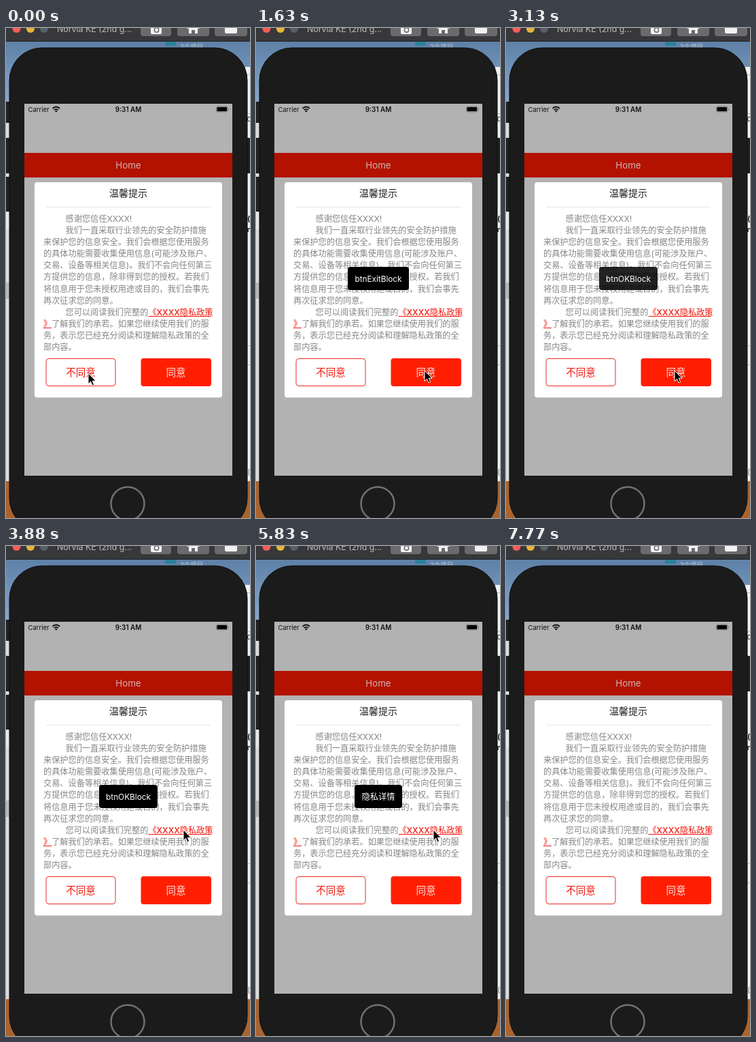
Recreate the animation shown at these times as an HTML page. Size 359 px wide and 718 px high, loop 8.02 s.

```html
<!DOCTYPE html>
<html lang="zh-CN">
<head>
<meta charset="utf-8">
<style>
html, body { margin: 0; width: 100%; height: 100%; overflow: hidden; background: #1b1b1b; }
svg { display: block; width: 359px; height: 718px; }
text { font-family: Inter, "Noto Sans CJK SC", "Noto Sans CJK", sans-serif; text-spacing-trim: space-all; }
.mid { text-anchor: middle; }
#body { font-size: 12.2px; fill: #858585; }
.link { fill: #f3160c; font-weight: 500; }
</style>
</head>
<body>
<svg viewBox="0 0 359 718">
  <defs>
    <linearGradient id="sky" x2="0" y2="1">
      <stop offset="0" stop-color="#54779f"/><stop offset="1" stop-color="#8aa9cb"/>
    </linearGradient>
  </defs>

  <!-- desktop -->
  <rect width="359" height="718" fill="#dcdcdc"/>
  <rect width="359" height="110" fill="url(#sky)"/>
  <rect y="270" width="6" height="25" fill="#e9e9e9"/>
  <rect y="373" width="6" height="24" fill="#b9b9b9"/>
  <rect x="352" y="57" width="7" height="607" fill="#f1f1f1"/>
  <path d="M352 68.500h7M352 125.500h7M352 465.500h7M352 493.500h7" stroke="#bdbdbd"/>
  <g font-size="11" fill="#222">
    <text x="354.500" y="137">d</text>
    <text x="355" y="283" font-weight="700">(</text>
    <text x="354.500" y="299" font-weight="700">n</text>
    <text x="355" y="654" fill="#777">(</text>
  </g>
  <rect y="664" width="359" height="54" fill="#a9642f"/>
  <rect x="234" y="18" width="16" height="8" rx="1" fill="#2b819b"/>
  <text x="256" y="31" font-size="9.500" fill="#c5ced8">2个项目</text>

  <!-- window bar -->
  <rect width="359" height="20" fill="#38383a"/>
  <path d="M0 19.500H359" stroke="#202225"/>
  <circle cx="15.500" cy="1" r="6" fill="#fc5b57"/>
  <circle cx="36" cy="1" r="6" fill="#e5b53c"/>
  <circle cx="56" cy="1" r="6" fill="#57606b"/>
  <text x="75" y="6" font-size="12.400" fill="#bcbcbd">Norvia KE (2nd g...</text>
  <g fill="#6b6b6d">
    <rect x="198" y="-10" width="45" height="22" rx="4"/>
    <rect x="252" y="-10" width="47" height="22" rx="4"/>
    <rect x="307" y="-10" width="48" height="22" rx="4"/>
  </g>
  <g fill="#f2f2f2">
    <rect x="213" y="-5" width="16" height="14" rx="2"/>
    <path d="M266 1L275.500 -7L285 1H282V8H278V3H273V8H269V1Z"/>
    <rect x="322" y="-6" width="18" height="14" rx="2"/>
  </g>
  <circle cx="221.500" cy="3" r="3.200" fill="none" stroke="#6b6b6d" stroke-width="1.500"/>

  <!-- phone -->
  <g fill="#202123">
    <rect x="-4" y="108" width="11" height="31" rx="2"/>
    <rect x="-4" y="161" width="11" height="52" rx="2"/>
    <rect x="-4" y="218" width="11" height="51" rx="2"/>
    <rect x="352" y="161" width="11" height="52" rx="2"/>
  </g>
  <rect x="5" y="29" width="350" height="708" rx="48" fill="#1b1b1b" stroke="#0d0e10"/>
  <circle cx="179" cy="697" r="24.500" fill="#1b1b1b" stroke="#717171" stroke-width="2.500"/>
  <rect x="27" y="111" width="306" height="545" fill="#b2b2b2"/>
  <text x="32.500" y="123" font-size="9.500" fill="#111">Carrier</text>
  <g fill="none" stroke="#111" stroke-width="1.900">
    <path d="M68.500 117.800a7.400 7.400 0 0 1 10.600 0M70.700 120.200a4.400 4.400 0 0 1 6.200 0"/>
  </g>
  <path d="M72 121.700a2.500 2.500 0 0 1 3.600 0L73.800 123.800Z" fill="#111"/>
  <text x="180" y="123" class="mid" font-size="9.900" font-weight="600" fill="#111">9:31 AM</text>
  <rect x="309.500" y="115" width="16.500" height="8" rx="2.200" fill="none" stroke="#666" stroke-width=".8"/>
  <rect x="310.500" y="116" width="14.500" height="6" rx="1.200"/>
  <path d="M327 117.500q1.400 1.500 0 3Z" fill="#555"/>
  <rect x="27" y="183" width="306" height="36" fill="#b31200"/>
  <text x="180" y="206" class="mid" font-size="13.300" fill="#d0b3af">Home</text>

  <!-- dialog -->
  <rect x="42" y="226" width="276" height="315.500" rx="4" fill="#fff"/>
  <text x="180" y="247.300" class="mid" font-size="14" fill="#222">温馨提示</text>
  <path d="M59 262.500H301" stroke="#e6e6e6"/>
  <g id="body"></g>
  <path d="M209.500 422.500H302M55 439.500H67" stroke="#f3160c"/>
  <rect x="59" y="484.500" width="102" height="40" rx="4" fill="#fff" stroke="#ec2b25"/>
  <rect x="198.500" y="484" width="103.500" height="41" rx="4" fill="#ff1f00"/>
  <text x="110" y="510" class="mid" font-size="14.500" fill="#f3160c">不同意</text>
  <text x="250" y="510" class="mid" font-size="14.500" fill="#ffe4df">同意</text>

  <g id="toast">
    <rect y="350" height="34" rx="4"/>
    <text x="180" y="371.600" class="mid" fill="#fff"></text>
  </g>
  <path id="cursor" d="M0 0V15.500L3.600 12.200L6 17.800L8.600 16.700L6.200 11.200H11Z" stroke="#fff" stroke-width="1"/>
</svg>
<script>
const LOOP = 8020, STEP = 150;
const $ = s => document.querySelector(s);

// A leading tab marks an indented paragraph; | separates the link.
const lines = [
  '\t感谢您信任XXXX!',
  '\t我们一直采取行业领先的安全防护措施',
  '来保护您的信息安全。我们会根据您使用服务',
  '的具体功能需要收集使用信息(可能涉及账户、',
  '交易、设备等相关信息)。我们不会向任何第三',
  '方提供您的信息，除非得到您的授权。若我们',
  '将信息用于您未授权用途或目的，我们会事先',
  '再次征求您的同意。',
  '\t您可以阅读我们完整的|《XXXX隐私政策|',
  '|》|了解我们的承若。如果您继续使用我们的服',
  '务，表示您已经充分阅读和理解隐私政策的全',
  '部内容。'
];
$('#body').innerHTML = lines.map((line, i) => {
  const spans = line.trim().split('|').map((s, k) => k === 1 ? `<tspan class="link">${s}</tspan>` : s);
  return `<text x="${line[0] === '\t' ? 87.5 : 55}" y="${283.5 + i * 17.18}">${spans.join('')}</text>`;
}).join('');

const toasts = [
  { label: 'btnExitBlock', width: 90, size: 11.8, start: 740, end: 2680 },
  { label: 'btnOKBlock', width: 86, size: 11.8, start: 3130, end: 5080 },
  { label: '隐私详情', width: 70, size: 12.3, start: 5680, end: 7620 }
];

// time, x, y of the pointer tip
const moves = [
  [0, 121, 506],
  [1180, 152, 509], [1330, 232, 510], [1480, 277, 508], [1630, 248, 502],
  [3580, 267, 474], [3730, 271, 432], [3880, 261, 416],
  [6880, 264, 432], [7030, 277, 493], [7180, 294, 574], [7330, 309, 649], [7480, 318, 693],
  [7620, 330, 740]
];

function toastAlpha({ start, end }, t) {
  if (t < start || t >= end + STEP) return 0;
  if (t < start + STEP) return 0.86;
  return t < end ? 1 : 0.5;
}

function draw(now) {
  const t = now % LOOP;
  const [, x, y] = moves.findLast(m => m[0] <= t);
  $('#cursor').setAttribute('transform', `translate(${x} ${y})`);

  const toast = toasts.findLast(m => m.start <= t) || toasts[0];
  $('#toast').setAttribute('opacity', toastAlpha(toast, t));
  const box = $('#toast rect'), label = $('#toast text');
  box.setAttribute('x', 180 - toast.width / 2);
  box.setAttribute('width', toast.width);
  label.setAttribute('font-size', toast.size);
  label.textContent = toast.label;
  requestAnimationFrame(draw);
}
draw(performance.now());
</script>
</body>
</html>
```
